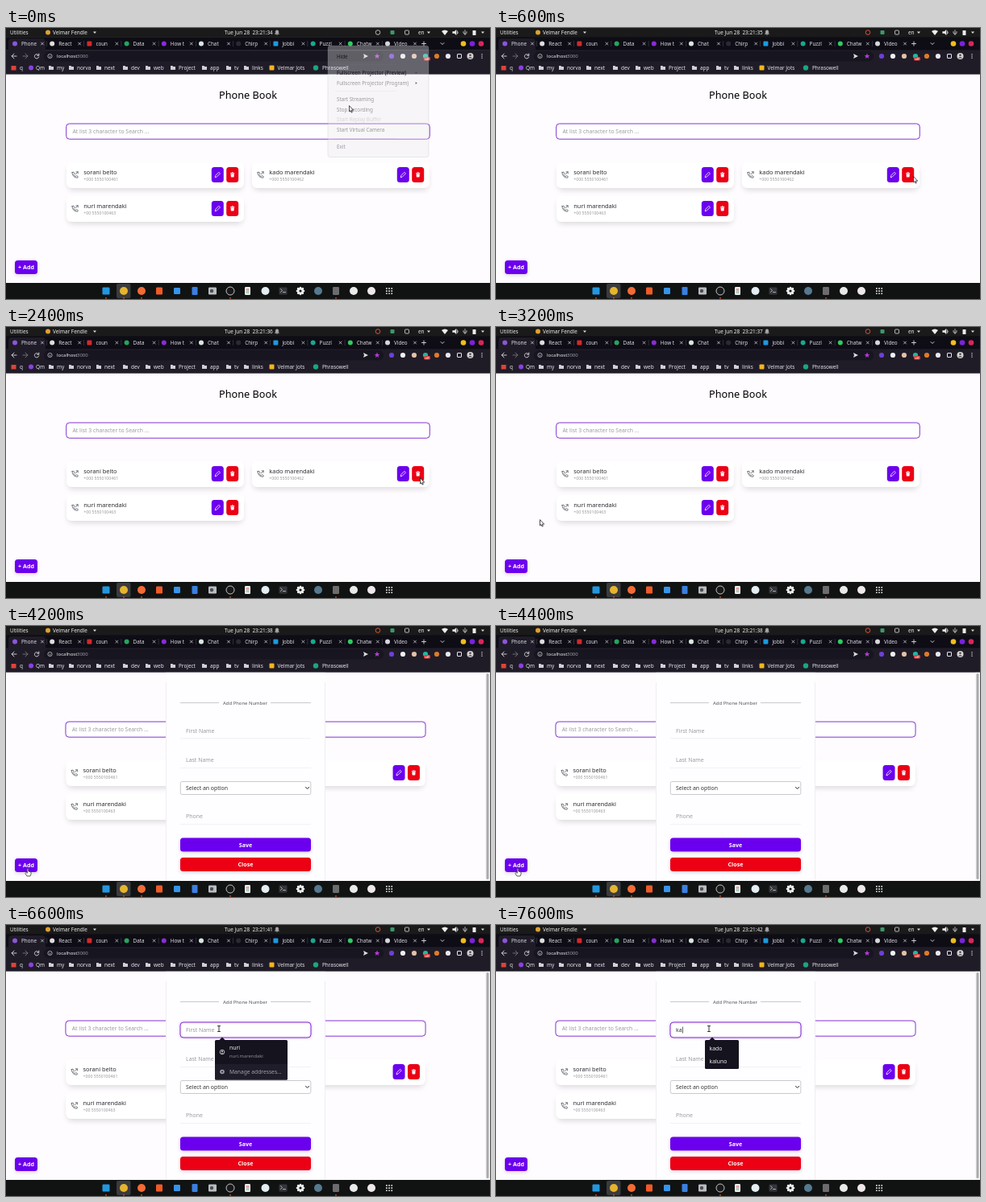
An HTML page with a canvas that plays this animation: 600x337 px, repeating every 8 s.

```html
<!DOCTYPE html>
<html lang="en">
<head>
<meta charset="utf-8">
<title>Phone Book</title>
<style>
  html, body { margin: 0; width: 100%; height: 100%; overflow: hidden; background: #fff; }
  canvas { display: block; width: 100vw; height: 100vh; }
</style>
</head>
<body>
<canvas id="stage"></canvas>
<script>
const W = 600, H = 337, LOOP = 8000, STEP = 200;
const PURPLE = '#6b00ee', RED = '#eb0014', BORDER = '#8433d3', GREY = '#9b9ba1', CHROME = '#1f1c28';
const canvas = document.getElementById('stage');
const ctx = canvas.getContext('2d');
const scale = window.devicePixelRatio || 1;
canvas.width = W * scale;
canvas.height = H * scale;

// Drawing helpers
function box(x, y, w, h, fill, r = 0, stroke, lineWidth = 1) {
  ctx.beginPath();
  ctx.roundRect(x, y, w, h, r);
  if (fill) { ctx.fillStyle = fill; ctx.fill(); }
  if (stroke) { ctx.strokeStyle = stroke; ctx.lineWidth = lineWidth; ctx.stroke(); }
}
function dot(x, y, r, fill, stroke, lineWidth = 1) {
  box(x - r, y - r, 2 * r, 2 * r, fill, r, stroke, lineWidth);
}
function text(s, x, y, size, color, align = 'left', weight = '') {
  ctx.font = `${weight} ${size}px "Noto Sans", "Open Sans", sans-serif`;
  ctx.textAlign = align;
  ctx.fillStyle = color;
  ctx.fillText(s, x, y);
}
function path(d, x, y, stroke, fill, lineWidth = 1) {
  const p = new Path2D(d);
  ctx.save();
  ctx.translate(x, y);
  if (fill) { ctx.fillStyle = fill; ctx.fill(p); }
  if (stroke) {
    ctx.strokeStyle = stroke;
    ctx.lineWidth = lineWidth;
    ctx.lineJoin = ctx.lineCap = 'round';
    ctx.stroke(p);
  }
  ctx.restore();
}
function shadowed(blur, dy, color, draw) {
  ctx.save();
  ctx.shadowBlur = blur * scale;
  ctx.shadowOffsetY = dy * scale;
  ctx.shadowColor = color;
  draw();
  ctx.restore();
}
const caretDown = (x, y, color = '#ddd') => path('M-2-1H2L0 1.5Z', x, y, null, color);

function drawTopBar(t) {
  box(0, 0, W, 11.5, '#1a1a1a');
  text('Utilities', 5, 8, 6.4, '#eee');
  dot(52, 5.5, 3, '#e0a030');
  text('Velmar Fendle', 58, 8, 6.4, '#eee');
  caretDown(110, 5.5);
  const seconds = Math.floor(34.5 + t / 1000);
  text(`Tue Jun 28  23:21:${seconds}`, 271, 8, 6.4, '#eee');
  path('M-2.5 2H2.5L1.8 1V-1A1.8 1.8 0 0 0-1.8-1V1ZM-.6 3H.6', 336, 5.5, '#aaa', '#aaa', .5);
  dot(461, 5.5, 2.8, null, t < STEP ? '#b5b5b5' : '#d8523c', 1);
  box(476.5, 3, 5, 5, '#3a9a6b', 1);
  box(494.5, 3, 5, 5, null, 1, '#ddd', .8);
  text('en', 511, 8, 6.4, '#eee');
  caretDown(524, 5.5);
  path('M-4-2Q0-5 4-2L0 3Z', 544, 6, null, '#eee');
  path('M-3-1H-1L1-3V3L-1 1H-3ZM2.5-2Q4 0 2.5 2', 557, 5.5, '#eee', '#eee', .6);
  path('M0 3V-3M-2-1V1L0 2L2 1V-1', 569, 5.5, '#eee', null, .7);
  box(578.5, 3, 4, 6, '#eee', .6);
  caretDown(591, 5.5);
}

const TABS = [
  ['Phone', '#8d55d8'], ['React', '#ddd'], ['coun', '#d12a2a'], ['Data', '#25a55c'],
  ['How t', '#8a2bd8'], ['Chat', '#d9e6e0'], ['Chirp', '#2b2933'], ['Jobbi', '#1a9be0'],
  ['Puzzl', '#17a98f'], ['Chatw', '#2fcc60'], ['Video', '#d6d6da']
];
const EXTENSIONS = ['#6f3fd8', '#f0f0f4', '#e3c0a6', '#1fb8a0', '#df7a28', '#e8e8ee', '#e8e8ee'];
const FOLDERS = [[56, 'my'], [81, 'norva'], [115, 'next'], [148, 'dev'], [176, 'web'],
  [207, 'Project'], [246, 'app'], [276, 'tv'], [298, 'links']];

function drawBrowser() {
  box(0, 11.5, W, 16, '#0e0c15');
  box(3, 13, 46, 15, CHROME, [4, 4, 0, 0]);
  TABS.forEach(([title, color], i) => {
    const x = 11 + 46.2 * i;
    if (i % 5 === 2) box(x - 3, 16.5, 6, 6, color, 1); else dot(x, 19.5, 3, color);
    text(title, x + 8, 22, 6.3, '#dedee4');
    path('M-1.5-1.5L1.5 1.5M1.5-1.5L-1.5 1.5', x + 34, 19.5, '#d0d0d6', null, .8);
    if (i) box(x - 7, 16, .6, 7, '#45444f');
  });
  path('M-2.5 0H2.5M0-2.5V2.5', 518, 19.5, '#ddd', null, .9);
  path('M-2-1L0 1L2-1', 541, 19.5, '#ddd', null, .9);
  ['#f0bd1c', '#7a22dc', '#d8275a'].forEach((c, i) => dot(567 + 11 * i, 19.5, 3.3, c));

  box(0, 27.5, W, 30, CHROME);
  box(47, 29, 421, 12.5, '#17151f', 6);
  path('M3 0H-3L0-3M-3 0L0 3', 10, 35, '#ddd', null, .9);
  path('M-3 0H3L0-3M3 0L0 3', 24, 35, '#777', null, .9);
  path('M2.5-1A2.7 2.7 0 1 0 2.7 1M2.8-3V-.8H.6', 38, 35, '#ddd', null, .9);
  dot(54.5, 35, 2.6, null, '#ccc', .8);
  box(54.1, 34.5, .8, 2, '#ccc');
  text('localhost', 63, 37.3, 6, '#eee');
  text(':3000', 86.4, 37.3, 6, '#a0a0aa');
  path('M-3-3L3 0L-3 3L-2 0Z', 446, 35, null, '#ddd');
  path('M0-3.4L1 -1H3.4L1.5.6L2.2 3L0 1.6L-2.2 3L-1.5.6L-3.4-1H-1Z', 460, 35, null, '#b63bd8');
  EXTENSIONS.forEach((c, i) => {
    const x = 478 + 14 * i;
    if (i === 6) box(x - 2.5, 32.5, 5, 5, null, .5, c); else dot(x, 35, 3.1, c);
  });
  box(518, 36, 8, 4.5, '#e0403c', 1.5);
  text('off', 522, 39.7, 4, '#fff', 'center');
  dot(575.5, 35, 4, '#d9d3d0');
  path('M-2.7 2.6Q0-.6 2.7 2.6Z', 575.5, 35, null, '#414550');
  dot(575.5, 33.8, 1.3, '#414550');
  [-2.3, 0, 2.3].forEach(dy => dot(590, 35 + dy, .7, '#ddd'));

  const mark = (s, x) => text(s, x, 52, 6.4, '#e6e6ea');
  box(6.5, 47, 6, 5.5, '#de4438');
  mark('q', 17);
  dot(31, 49.5, 3, '#8c40e0');
  mark('Qm', 37);
  FOLDERS.forEach(([x, label]) => {
    path('M-3-2.4H-.5L.3-1.5H3V2.5H-3Z', x, 49.5, null, '#cfcfd4');
    mark(label, x + 7);
  });
  box(326.5, 46.5, 6, 6, '#f5b51c', 1);
  mark('Velmar Jots', 336.5);
  dot(384, 49.5, 3.2, '#1aa77c');
  mark('Phrasowell', 392);
}

function drawDock() {
  box(0, 317, W, 20, '#111313');
  box(137, 318, 17.5, 18, '#3b3b3e', 2);
  const square = (x, c, w = 9, h = 9) => box(x - w / 2, 327 - h / 2, w, h, c, 1.3);
  square(124, '#2496de');
  dot(146, 327, 5, '#e5b52e');
  dot(168, 327, 5, '#f36b35');
  square(190, '#ee5a28', 8, 9);
  square(212, '#3794ea', 8, 8);
  square(234, '#3a7fe0', 7, 10);
  square(256, '#b9bcc0', 10, 9);
  dot(255, 327, 2.2, '#4b4f55');
  dot(278, 327, 5, '#19191b', '#d4d4d4', .9);
  square(299.5, '#eeeeec', 7, 10);
  [-2, 0, 2].forEach((d, i) => box(297.5, 326.5 + d, 4, 1, ['#d8564c', '#999', '#6a9'][i]));
  dot(321.5, 327, 5, '#e3edf2');
  square(343.5, '#34363b', 10, 9);
  path('M-3-2L-1 0L-3 2M0 2H3', 343.5, 326.5, '#ccc', null, .8);
  for (let i = 0; i < 8; i++) {
    const a = i * Math.PI / 4;
    dot(365 + 4 * Math.cos(a), 327 + 4 * Math.sin(a), 1.3, '#eee');
  }
  dot(365, 327, 2.8, null, '#eee', 2.4);
  dot(387, 327, 5, '#56798f');
  square(409, '#6c6c6e', 8, 10);
  dot(431, 327, 5, '#e9e9e9');
  dot(453, 327, 5, '#eee8ec');
  for (let i = 0; i < 9; i++) box(471 + 3.2 * (i % 3), 323 + 3.2 * Math.floor(i / 3), 1.7, 1.7, '#ddd');
  [124, 146, 168, 278, 409].forEach(x => dot(x, 335.8, .9, '#e95420'));
}

function drawButton(x, y, w, h, label, color) {
  shadowed(4, 1.5, 'rgba(60,30,90,.2)', () => box(x, y, w, h, color, 3.5));
  text(label, x + w / 2, y + h / 2 + 2.6, 7.1, '#fff', 'center', 'bold');
}

function drawCard(x, y, w, name, phone) {
  shadowed(7, 4, 'rgba(0,0,0,.14)', () => box(x + 1.5, y + 1.5, w - 3, 29, '#fff', 6));
  box(x, y, w, 32, '#fff', 6);
  path('M-3.5-2.8L-1.8-3.5L-.6-1.2L-1.6-.2Q-.8 1.4.7 2.1L1.8 1L3.8 2.2L3.2 3.8Q-3.2 3.6-3.5-2.8ZM.8-.8L3.6-3.6M1.5-3.7H3.7V-1.5',
    x + 10.5, y + 15.5, '#555a62', null, .8);
  text(name, x + 21.3, y + 15, 7.4, '#2c2c34', 'left', '500');
  text(phone, x + 21.3, y + 23.2, 5.2, '#96969c');
  const edit = x + w - 40.2, trash = x + w - 21.8;
  box(edit, y + 6, 15, 19, PURPLE, 3.5);
  path('M-3 3L-2.4.8L1.6-3.2L3.2-1.6L-.8 2.4Z', edit + 7.5, y + 15.5, '#fff', null, .8);
  box(trash, y + 6, 15, 19, RED, 3.5);
  path('M-2.2-1.2H2.2L1.8 3H-1.8ZM-2.6-2.6H2.6V-1.8H-2.6ZM-.9-3.2H.9V-2.4H-.9Z', trash + 7.5, y + 15.5, null, '#fff');
}

function drawPage(modalOpen) {
  const width = modalOpen ? 594 : W, left = width / 8, inner = width * .75;
  const cardWidth = (inner - 10) / 2, right = left + cardWidth + 10;
  box(0, 57.5, W, 259.5, '#fefcff');
  text('Phone Book', width / 2, 88, 12.7, '#000', 'center');
  box(left - .3, 119, inner + .6, 19.2, '#fff', 4, BORDER);
  text('At list 3 character to Search ...', left + 7.5, 131, 6.85, GREY);
  drawCard(left, 167, cardWidth, 'sorani belto', '+000 5550100461');
  drawCard(right, 167, cardWidth, 'kado marendaki', '+000 5550100462');
  drawCard(left, 209, cardWidth, 'nuri marendaki', '+00 5550100463');
  drawButton(11, 289, 28, 17, '+ Add', PURPLE);
  if (modalOpen) {
    box(594, 57.5, 6, 259.5, '#f6f6f7');
    box(595.5, 59, 3, 256, '#a9a9ad', 1.5);
  }
}

function drawModal(focused, typed, caret) {
  box(198, 57.5, 198, 259.5, '#fefdff');
  box(198, 70, .7, 247, '#e9e7eb');
  box(395.3, 70, .7, 247, '#e9e7eb');
  box(216, 95, 48, .8, '#b9b9bd');
  box(328, 95, 50, .8, '#b9b9bd');
  text('Add Phone Number', 296.5, 97.7, 5.9, '#55555c', 'center');
  [139.5, 176, 246].forEach(y => box(216, y, 162, .7, '#ececee'));
  if (focused) {
    shadowed(3, 0, 'rgba(125,32,210,.3)', () => box(216, 121, 162, 19, '#fff', 4, BORDER));
  }
  text(typed || 'First Name', 223, 133, 6.95, typed ? '#333' : GREY);
  if (caret) box(223.5 + (typed ? ctx.measureText(typed).width : 0), 126.5, .7, 8, '#222');
  text('Last Name', 223, 169, 6.95, GREY);
  box(216.3, 193.5, 161.5, 16, '#fff', 2, '#bdbdc2', .8);
  text('Select an option', 223, 204, 6.9, '#333');
  path('M-2-1L0 1L2-1', 373.5, 201.5, '#222', null, 1);
  text('Phone', 223, 239, 6.95, GREY);
  drawButton(216, 263.5, 162, 17, 'Save', PURPLE);
  drawButton(216, 288, 162, 17, 'Close', RED);
}

function drawSuggestions(typed) {
  const dark = '#15131e';
  path('M-4 4L0 0L4 4Z', 268, 139.5, null, dark);
  if (typed) {
    box(259, 143, 42, 36, dark, 1.5);
    text('kado', 264.5, 155.7, 6.9, '#eee');
    text('kaluno', 264.5, 171.7, 6.9, '#eee');
    return;
  }
  box(259, 143, 90, 49.5, dark, 1.5);
  box(259, 173, 90, 19.5, '#1f1d29', [0, 0, 1.5, 1.5]);
  dot(268, 158, 2.8, null, '#ddd', .8);
  dot(268, 157.3, 1, '#ddd');
  path('M-1.7 1.8Q0 0 1.7 1.8Z', 268, 158, null, '#ddd');
  text('nuri', 277, 155.3, 6.9, '#eee');
  text('nuri.marendaki', 277, 165, 5.8, '#8d8b98');
  dot(268, 182.5, 2.8, '#9c9aa6');
  dot(268, 182.5, 1, '#1f1d29');
  text('Manage addresses...', 277, 185, 6.7, '#a3a1ad');
}

function drawTrayMenu() {
  box(399, 22, 125, 138.5, 'rgba(232,232,236,.35)', 3, 'rgba(150,150,155,.25)', .8);
  const ink = 'rgba(90,90,95,.6)', faint = 'rgba(120,120,125,.25)', black = '#17171b';
  [['Hide', 38, black], ['Fullscreen Projector (Preview)', 58, black], ['Fullscreen Projector (Program)', 71],
   ['Start Streaming', 91], ['Stop Recording', 103.5], ['Start Replay Buffer', 116, faint],
   ['Start Virtual Camera', 129], ['Exit', 149.5]
  ].forEach(([label, y, color]) => text(label, 410, y, 6.25, color || ink));
  [45, 78.5, 137].forEach(y => box(408, y, 76, .6, 'rgba(120,120,125,.15)'));
  [55.5, 68.5].forEach(y => path('M-.8-1.6L1.2 0L-.8 1.6Z', 508.5, y, null, 'rgba(60,60,65,.8)'));
}

// Pointer route: time, x, y
const ROUTE = [[0, 426, 97], [600, 518, 185], [1000, 300, 217], [1200, 186, 218], [1400, 173, 160],
  [1600, 263, 75], [2000, 400, 150], [2400, 514, 188], [2600, 514, 190], [3000, 180, 225],
  [3200, 55, 240], [3600, 35, 275], [4000, 27, 302], [4400, 27, 302], [4800, 95, 229],
  [5200, 205, 155], [5600, 263, 130], [6200, 264, 129], [LOOP, 264, 129]];

function pointerAt(t) {
  const i = ROUTE.findIndex(p => p[0] > t);
  const [t0, x0, y0] = ROUTE[i - 1], [t1, x1, y1] = ROUTE[i];
  const k = (t - t0) / (t1 - t0), e = k * k * (3 - 2 * k);
  return [x0 + (x1 - x0) * e, y0 + (y1 - y0) * e];
}

function drawPointer(t, modalOpen) {
  const [x, y] = pointerAt(t);
  const within = (x0, y0, x1, y1) => x > x0 && x < x1 && y > y0 && y < y1;
  const overField = modalOpen ? within(216, 121, 378, 140) : within(75, 119, 525, 138);
  if (overField) {
    path('M-1.5-3.5H1.5M0-3.5V3.5M-1.5 3.5H1.5', x, y, '#222', null, .9);
  } else if (within(11, 289, 39, 306)) {
    path('M-.8 0Q0-1 .8 0V3L4 4V6.5L3 9H-1L-3.2 5.5Q-2.8 4-.8 5Z', x, y, '#333', '#fff', .8);
  } else {
    path('M0 0V7L1.6 5.6L2.6 8.1L3.8 7.6L2.8 5.2H4.8Z', x - .5, y, '#222', '#fff', .8);
  }
}

function draw(t) {
  const modalOpen = t >= 4000, focused = t >= 5800, popup = t >= 6000;
  const typed = t >= 7400 ? 'ka' : t >= 7200 ? 'k' : '';
  const caret = focused && (typed || Math.floor((t - 5800) / 500) % 2 === 0);
  ctx.setTransform(scale, 0, 0, scale, 0, 0);
  drawPage(modalOpen);
  if (modalOpen) drawModal(focused, typed, caret);
  if (popup) drawSuggestions(typed);
  drawTopBar(t);
  drawBrowser();
  drawDock();
  if (t < STEP) drawTrayMenu();
  drawPointer(t, modalOpen);
}

const start = performance.now();
function tick() {
  const t = (performance.now() - start) % LOOP;
  draw(Math.floor(t / STEP) * STEP);
  requestAnimationFrame(tick);
}
tick();
</script>
</body>
</html>
```
